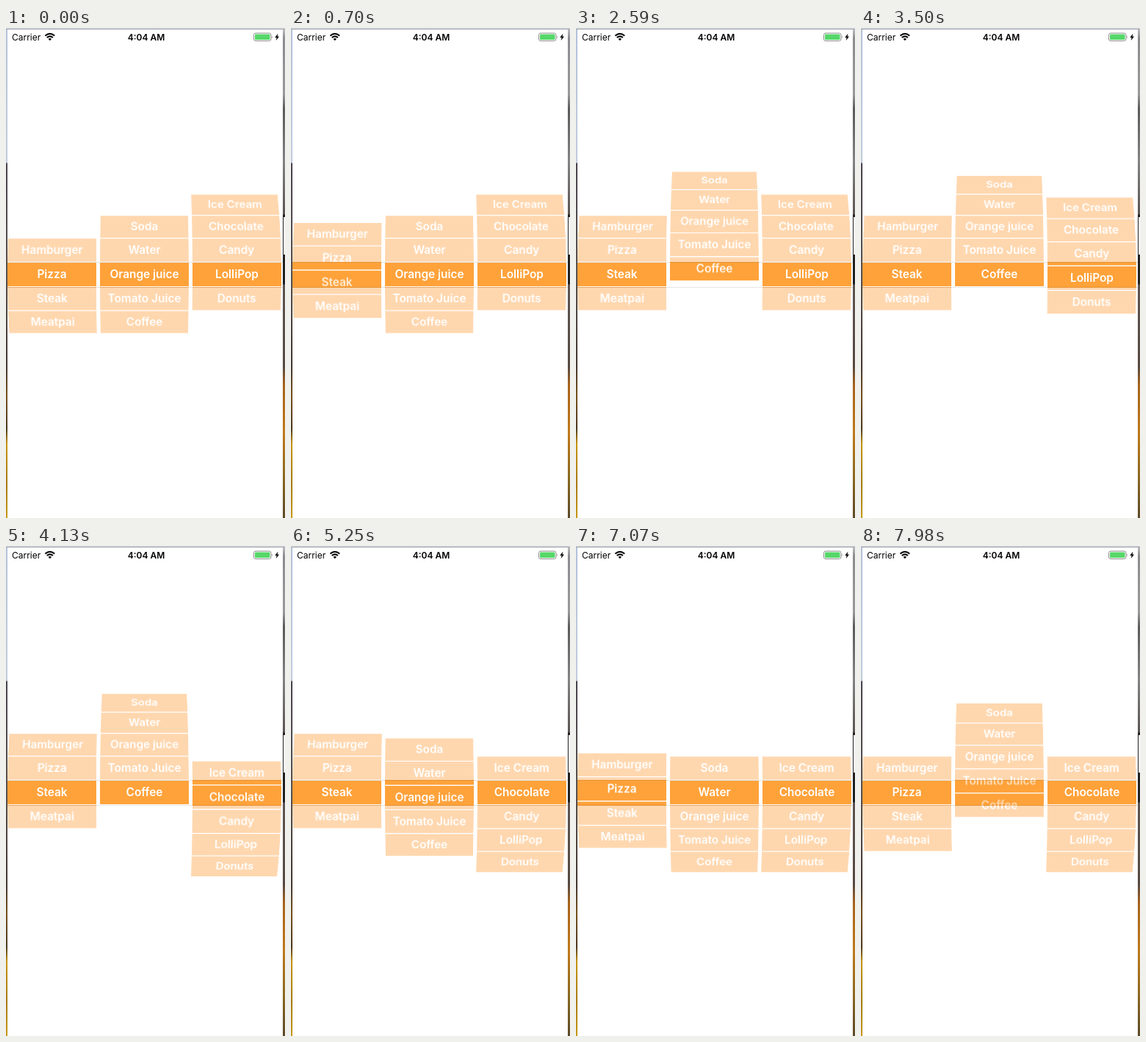
Write an HTML page that moves like this. It is 380 px wide and 666 px high and loops after 8000 ms.

```html
<!DOCTYPE html>
<html lang="en">
<head>
<meta charset="utf-8">
<title>Menu picker</title>
<style>
  html, body { margin: 0; width: 100%; height: 100%; overflow: hidden; }
  body { position: relative; background: #fff; font-family: Inter, Roboto, sans-serif; }
  .edge, .status, .status *, .view, .wheel, .row, .line { position: absolute; }

  .left {
    left: 0; top: 0; width: 2px; height: 666px;
    background: linear-gradient(#b4c2da 0, #c3cddd 183px, #4b4650 184px, #5b5350 330px,
      #463a34 460px, #7a5420 500px, #4e3c26 545px, #c8960f 565px, #a87c16 620px, #c89a14 666px);
  }
  .right {
    left: 377px; top: 0; width: 3px; height: 666px;
    background: linear-gradient(#c4c4c8 0, #8d8c90 14px, #9a999c 90px, #5d5a5c 110px, #858385 180px,
      #5c5654 253px, #222 254px, #222 348px,
      #5e5552 349px, #574a42 460px, #a8641e 485px, #c07a1c 550px, #8d6a22 610px, #5d4a2a 666px);
  }
  .page { left: 378px; top: 257px; width: 2px; height: 51px; background: #f4f4f4; }
  .top { left: 0; top: 0; width: 380px; height: 1px; background: #d8dce2; border-bottom: 1px solid #9a9fa7; }

  .status { left: 0; top: 5px; width: 380px; height: 15px; font-size: 12px; line-height: 15px; color: #000; }
  .carrier { left: 8px; }
  .clock { left: 141px; width: 100px; text-align: center; font-weight: 600; }
  .status svg { left: 0; top: -5px; }

  .view { inset: 0; perspective: 900px; perspective-origin: 188.5px 335px; }
  .band { left: 2px; width: 375px; background: #fff; clip-path: inset(318px 0 313px); perspective-origin: 186.5px 335px; }
  .band .wheel { margin-left: -2px; }
  .wheel {
    top: 335px; width: 121px; height: 0; transform-style: preserve-3d;
    transform: translateZ(-253px) rotateX(calc(var(--pos) * 7.5deg));
  }
  .row {
    top: -16px; width: 121px; height: 32px; line-height: 31px;
    text-align: center; white-space: nowrap; font-size: 15.4px; font-weight: 600;
    color: #fff; background: #ffd7af;
    transform: rotateX(calc(var(--i) * -7.5deg)) translateZ(253px);
  }
  /* labels inside the band fade as their row leaves the middle */
  .band .row {
    --away: max(var(--i) - var(--pos), var(--pos) - var(--i));
    color: rgba(255, 255, 255, calc(1.2 - 1.2 * var(--away)));
    background: #ffa23a;
  }
  .line { left: 2px; width: 375px; height: 1px; background: rgba(0, 0, 0, .1); }
</style>
</head>
<body>
  <div class="view" id="pale"></div>
  <div class="view band" id="band"></div>
  <div class="line" style="top:318px"></div>
  <div class="line" style="top:352px"></div>

  <div class="edge left"></div>
  <div class="edge right"></div>
  <div class="edge page"></div>
  <div class="edge top"></div>

  <div class="status">
    <span class="carrier">Carrier</span>
    <span class="clock">4:04 AM</span>
    <svg width="380" height="24">
      <g fill="none" stroke="#000" stroke-width="2">
        <path d="M53.4 10.6Q59.8 5 66.2 10.6"/>
        <path d="M55.7 13.1Q59.8 9.6 63.9 13.1"/>
      </g>
      <path d="M57.5 14.8Q59.8 13 62.1 14.8L59.8 17.2Z"/>
      <rect x="337.5" y="7" width="23.5" height="10.5" rx="2.5" fill="none" stroke="#8c8c8c"/>
      <rect x="339" y="8.5" width="20.5" height="7.5" rx="1" fill="#56d769"/>
      <path d="M362.2 10.5Q364 12.2 362.2 14Z" fill="#8c8c8c"/>
      <path d="M370.4 7.5L366.3 13H368.6L367.8 17L372 11.4H369.6Z"/>
    </svg>
  </div>

<script>
  const LOOP = 8000, TICK = 70;
  const drag = x => x * x * (3 - 2 * x);
  const flick = x => 1 - (1 - x) ** 5;

  // moves: [start ms, end ms, row reached, easing]
  const columns = [
    { rows: ['Hamburger', 'Pizza', 'Steak', 'Meatpai'], start: 1,
      moves: [[230, 760, 1.7, drag], [760, 1400, 2, flick],
              [6460, 6990, 1.3, drag], [6990, 7560, 1, flick]] },
    { rows: ['Soda', 'Water', 'Orange juice', 'Tomato Juice', 'Coffee'], start: 2,
      moves: [[1890, 2590, 4.23, drag], [2590, 3290, 4, flick],
              [4990, 6100, 1, flick], [7720, 8608, 4, flick]] },
    { rows: ['Ice Cream', 'Chocolate', 'Candy', 'LolliPop', 'Donuts'], start: 3,
      moves: [[3380, 4130, 0.8, drag], [4130, 4830, 1, flick]] }
  ];

  function addWheel(view, column, index) {
    const wheel = document.createElement('div');
    wheel.className = 'wheel';
    wheel.style.left = 2 + index * 126 + 'px';
    column.rows.forEach((label, i) => {
      const row = document.createElement('div');
      row.className = 'row';
      row.style.setProperty('--i', i);
      row.textContent = label;
      wheel.append(row);
    });
    view.append(wheel);
    return wheel;
  }

  const views = [document.getElementById('pale'), document.getElementById('band')];
  columns.forEach((column, i) => {
    column.wheels = views.map(view => addWheel(view, column, i));
  });

  function positionAt({ start, moves }, time) {
    let pos = start;
    for (const [from, to, target, ease] of moves) {
      if (time <= from) break;
      pos += (target - pos) * ease(Math.min(1, (time - from) / (to - from)));
    }
    return pos;
  }

  const begin = performance.now();
  function draw() {
    const elapsed = (performance.now() - begin) % LOOP;
    const time = Math.floor(elapsed / TICK) * TICK;
    for (const column of columns) {
      const pos = positionAt(column, time);
      column.wheels.forEach(wheel => wheel.style.setProperty('--pos', pos));
    }
    requestAnimationFrame(draw);
  }
  draw();
</script>
</body>
</html>
```
